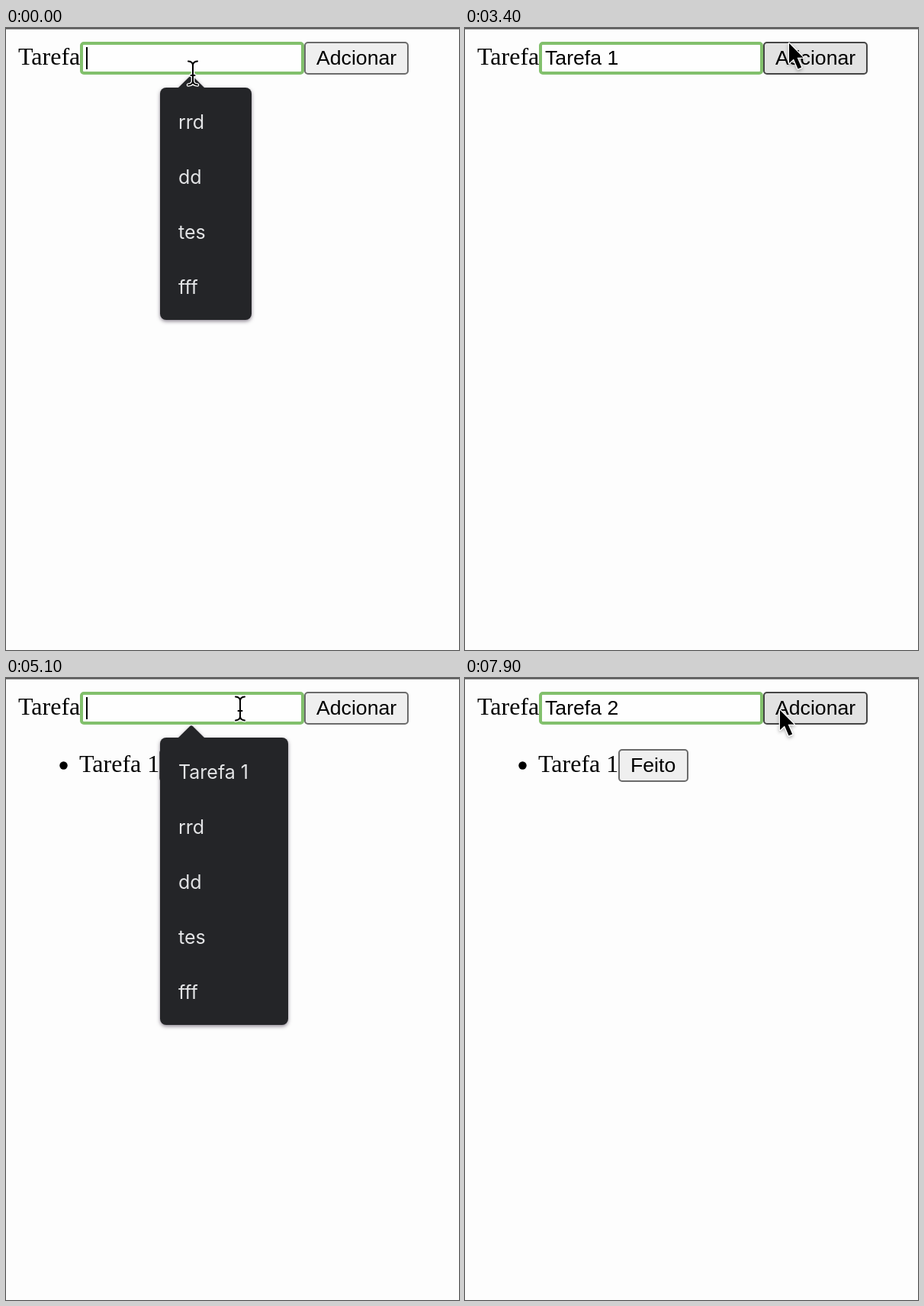
Write an HTML page that moves like this. It is 594 px wide and 814 px high and loops after 8000 ms.

```html
<!DOCTYPE html>
<html lang="pt">
<head>
<meta charset="utf-8">
<title>Lista de tarefas</title>
<style>
  html, body { margin: 0; width: 100%; height: 100%; overflow: hidden; background: #fdfdfd; }
  svg { display: block; width: 594px; height: 814px; }
  text { white-space: pre; }
  .page { font: 32px "Liberation Serif", "Times New Roman", serif; }
  .ui { font: 26.667px "Liberation Sans", Arial, sans-serif; }
  .option { font: 25px Inter, Roboto, sans-serif; fill: #e3e4e6; }
  #popup { filter: drop-shadow(0 2px 2.5px rgba(30, 15, 40, .5)); }
  #arrow { filter: drop-shadow(0 2px 2px rgba(0, 0, 0, .3)); }
  .btn { fill: #efefef; stroke: #6b6b6b; stroke-width: 2; }
  .btn.hover { fill: #e2e2e2; stroke: #454545; }
  .btn.active { fill: #f5f5f5; stroke: #8a8a8a; }
  .field { fill: #fefefe; stroke: #686868; stroke-width: 2; }
  .field.hover { stroke: #3c3c3c; }
  .field.focus { stroke: #82c06c; stroke-width: 4; }
</style>
</head>
<body>
<svg viewBox="0 0 594 814">
  <rect width="594" height="814" fill="#fdfdfd"/>
  <rect width="594" height="1.6" fill="#555"/>
  <text class="page" x="16" y="48">Tarefa</text>
  <rect id="field"/>
  <text id="typed" class="ui" x="105" y="48"></text>
  <rect id="caret" y="25" width="2" height="29"/>
  <rect id="add" class="btn" x="392" y="19" width="135" height="41" rx="4"/>
  <text class="ui" x="407" y="48">Adcionar</text>
  <g id="item">
    <circle cx="75.5" cy="114.5" r="5.2"/>
    <text class="page" x="96" y="123">Tarefa 1</text>
    <rect class="btn" x="202" y="94" width="90" height="41" rx="4"/>
    <text class="ui" x="217" y="123">Feito</text>
  </g>
  <g id="popup">
    <path d="M225 79 L241 63.2 Q243 61.4 245 63.2 L261 79Z" fill="#242528"/>
    <rect id="panel" x="202" y="78" rx="8" fill="#242528"/>
    <g id="options"></g>
  </g>
  <g id="beam" fill="none" stroke-linecap="round">
    <path id="beamLine" d="M-6 -15.5 Q0 -15 0 -10 Q0 -15 6 -15.5 M0 -10 V10 M-6 15.5 Q0 15 0 10 Q0 15 6 15.5 M-2.5 3 H2.5"/>
  </g>
  <path id="arrow" d="M0 0 V26 L6 20.5 L11.6 33.6 L16.2 31.6 L10.6 18.8 H18.6Z"
        stroke="#fff" stroke-width="2.6" paint-order="stroke" stroke-linejoin="round"/>
</svg>
<script>
const LOOP = 8000;
const $ = id => document.getElementById(id);
const NS = "http://www.w3.org/2000/svg";

// Each track is a list of [start, value...] held until the next step.
const text = [
  [0, ""], [900, "T"], [1100, "Ta"], [1300, "Tar"], [1600, "Tare"], [1700, "Taref"],
  [1900, "Tarefa"], [2100, "Tarefa "], [2700, "Tarefa 1"], [4100, ""],
  [5800, "T"], [6000, "Ta"], [6300, "Tar"], [6400, "Tare"], [6600, "Taref"],
  [6700, "Tarefa"], [7000, "Tarefa "], [7200, "Tarefa 2"]
];
const caret = [
  [0, 1], [400, 0], [900, 1], [2600, 0], [2700, 1], [3200, 0], [3700, 1],
  [4000, 0], [5000, 1], [5500, 0], [5800, 1], [7700, 0]
];
const field = [[0, "focus"], [4000, ""], [4700, "hover"], [5000, "focus"]];
const add = [[0, ""], [3400, "hover"], [4000, "active"], [4100, "hover"], [4700, ""], [7800, "hover"]];
const item = [[0, 0], [4100, 1]];
const popup = [
  [0, "rrd,dd,tes,fff"], [900, "tes"], [1200, ""],
  [5100, "Tarefa 1,rrd,dd,tes,fff"], [5800, "Tarefa 1,tes"], [6100, "Tarefa 1"], [7200, ""]
];
const pointer = [
  [0, "beam", 245, 59], [200, "beam", 248, 53], [300, "beam", 250, 45], [400, "beam", 251, 41],
  [700, ""],
  [2900, "beam", 256, 40], [3000, "beam", 278, 35], [3100, "beam", 312, 28], [3200, "beam", 350, 23],
  [3300, "arrow", 390, 13], [3400, "arrow", 425, 20], [3500, "arrow", 452, 30],
  [3600, "arrow", 466, 37], [3700, "arrow", 470, 39], [3800, "arrow", 470, 38],
  [4500, "arrow", 462, 38], [4600, "arrow", 424, 38], [4700, "beam", 374, 39],
  [4800, "beam", 336, 40], [4900, "beam", 316, 40], [5000, "beam", 309, 40], [5100, "beam", 307, 40],
  [5700, ""],
  [7700, "beam", 345, 32], [7800, "arrow", 398, 40], [7900, "arrow", 413, 42]
];

const at = (track, t) => track.findLast(step => step[0] <= t).slice(1);
const show = (id, on) => $(id).style.display = on ? "" : "none";
const setAttrs = (el, attrs) => { for (const k in attrs) el.setAttribute(k, attrs[k]); };

// White halo below the dark stroke of the text pointer
const halo = $("beamLine").cloneNode();
halo.removeAttribute("id");
setAttrs(halo, { stroke: "#fff", "stroke-width": 4.6 });
setAttrs($("beamLine"), { stroke: "#000", "stroke-width": 2 });
$("beam").prepend(halo);

function drawPopup(list) {
  show("popup", list);
  if (!list) return;
  const names = list.split(",");
  setAttrs($("panel"), { width: list.includes("Tarefa") ? 168 : 120, height: 16 + 72 * names.length });
  $("options").replaceChildren(...names.map((name, i) => {
    const el = document.createElementNS(NS, "text");
    setAttrs(el, { class: "option", x: 226, y: 132 + 72 * i });
    el.textContent = name;
    return el;
  }));
}

function drawField(state) {
  const inset = state === "focus" ? 2 : 1;
  setAttrs($("field"), {
    class: "field " + state, x: 97 + inset, y: 18 + inset,
    width: 294 - 2 * inset, height: 43 - 2 * inset, rx: 3
  });
}

function draw(t) {
  drawField(at(field, t)[0]);
  $("add").setAttribute("class", "btn " + at(add, t)[0]);
  $("typed").textContent = at(text, t)[0];
  show("caret", at(caret, t)[0]);
  $("caret").setAttribute("x", 105 + $("typed").getComputedTextLength());
  show("item", at(item, t)[0]);
  drawPopup(at(popup, t)[0]);
  const [kind, x, y] = at(pointer, t);
  for (const id of ["beam", "arrow"]) {
    show(id, id === kind);
    if (id === kind) $(id).setAttribute("transform", `translate(${x} ${y})`);
  }
}

const start = performance.now();
function tick() {
  draw((performance.now() - start) % LOOP);
  requestAnimationFrame(tick);
}
tick();
</script>
</body>
</html>
```
